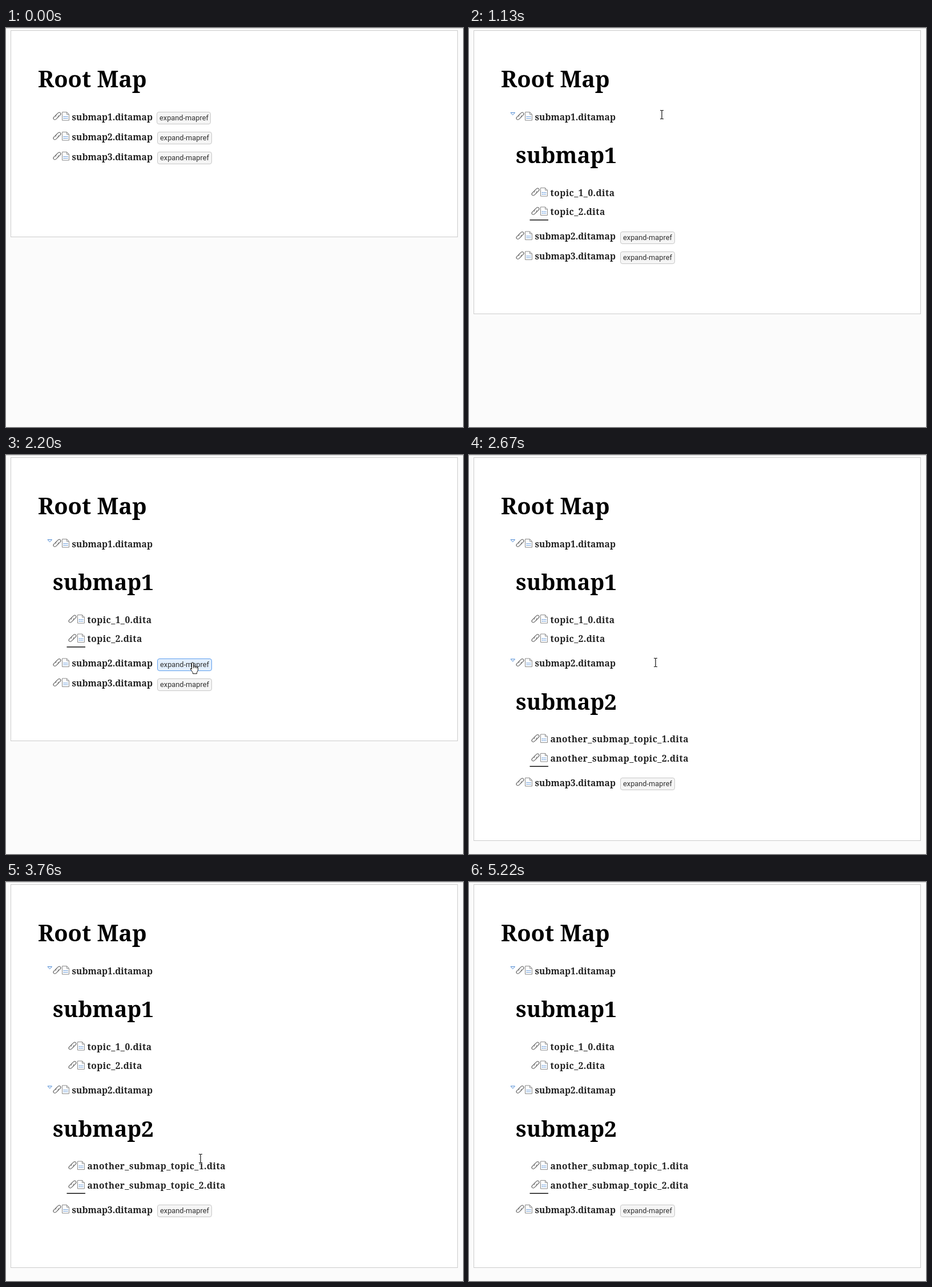
Animation, 801 px wide and 700 px high, one loop 5370 ms. Source, as an HTML page:

```html
<!DOCTYPE html>
<html lang="en">
<head>
<meta charset="utf-8">
<title>Root Map</title>
<style>
  html, body { margin: 0; width: 100%; height: 100%; overflow: hidden; background: #fbfbfb; }
  svg { display: block; }
  text { white-space: pre; }
  .title, .name { font-family: "Noto Serif", serif; font-weight: 700; }
  .title { font-size: 38.5px; }
  .root { font-size: 39.8px; }
  .name { font-size: 15.5px; fill: #222; }
  .topic { letter-spacing: .45px; }
  .label { font: 12.8px Roboto, sans-serif; fill: #333; }
  .tip { font: 12.6px Roboto, sans-serif; fill: #222; }
  .button { fill: #f5f5f5; stroke: #c8c8c8; }
  .hover { fill: #e3effd; stroke: #5f9fee; }
  .page { fill: #fff; stroke: #ccc; }
</style>
</head>
<body>
<svg width="801" height="700" viewBox="0 0 801 700">
  <defs>
    <g id="icons" fill="none">
      <g stroke="#777" stroke-width="1.3" transform="translate(7.5 -2.5) rotate(-45)">
        <path id="chain" d="M1.5-2.6H-5.4a2.6 2.6 0 0 0 0 5.2H-.5a2.6 2.6 0 0 0 2.5-2"/>
        <use href="#chain" transform="rotate(180)"/>
      </g>
      <path d="M16.5-9.5h8l4 4v10.5h-12zM24.5-9.5v4h4" stroke="#8a8a8a"/>
      <path d="M18.5-1.5h8M18.5 1.5h8" stroke="#4f8bd4" stroke-dasharray="2.4 .6"/>
    </g>
    <path id="arrow" d="M-9-9h7.5l-3.75 4.2z" fill="#fff" stroke="#4f8bd4"/>
    <g id="beam" fill="none">
      <path d="M-2.5-7.5h5M0-7.5v15M-2.5 7.5h5" stroke="#fff" stroke-width="2.5"/>
      <path d="M-3-7.5h2l1 .7 1-.7h2M0-7v14M-3 7.5h2l1-.7 1 .7h2" stroke="#111" stroke-width="1.2"/>
    </g>
    <path id="hand" fill="#fff" stroke="#111" stroke-linejoin="round"
      d="M-1.5.5q1.500-1.200 3 0V7q1.500-1 3 .5 2-.8 3 .7 2-.4 2 1.500v4l-2 4v2h-7v-2l-4-5.500q-.8-2 1-1.800l1 1.600zM1.500 7v3M4.500 7.500V10M7.500 8.200v2.300"/>
  </defs>
  <g id="scene"></g>
</svg>
<script>
const LOOP = 5370;
const scene = document.getElementById("scene");

const submaps = [
  { name: "submap1", opens: 1130, topics: ["topic_1_0", "topic_2"] },
  { name: "submap2", opens: 2670, topics: ["another_submap_topic_1", "another_submap_topic_2"] },
  { name: "submap3", opens: Infinity }
];

// Pointer path as [time, x, y]; straight, steady moves between the points
const path = [
  [100, 669, 570], [500, 372, 190], [640, 338, 152], [1450, 338, 152], [1670, 339, 232],
  [2030, 327, 364], [3460, 327, 365], [3760, 341, 485], [4140, 340, 582], [4600, 657, 689], [4680, 657, 689]
];

// The caret shows for one half period after each of these times
const blinkStarts = [1130, 2120, 2670, 3530, 4600, 5220];
const BLINK = 540;

const text = (x, y, kind, str) => `<text x="${x}" y="${y}" class="${kind}">${str}</text>`;
const rect = (x, y, w, h, attrs = "") => `<rect x="${x}" y="${y}" width="${w}" height="${h}" ${attrs}/>`;
const use = (id, x, y) => `<use href="#${id}" x="${x}" y="${y}"/>`;

function pointerAt(t) {
  const next = path.findIndex(point => t < point[0]);
  if (next < 1) return null;
  const [t0, x0, y0] = path[next - 1], [t1, x1, y1] = path[next];
  const k = (t - t0) / (t1 - t0);
  return { x: Math.round(x0 + (x1 - x0) * k), y: Math.round(y0 + (y1 - y0) * k) };
}

const row = (x, y, name, kind = "") =>
  use("icons", x, y) + text(x + 33.5, y + 4.5, "name " + kind, name);

const button = (x, y, width, hovered) =>
  rect(x, y - 9.5, width, 21, `rx="3.5" class="button ${hovered ? "hover" : ""}"`) +
  text(x + 4.5, y + 5, "label", "expand-mapref");

function tip(y) {
  return rect(-1, y - 8, 105.5, 18.5, 'fill="#d3ee90" stroke="#66704d"') +
    rect(0, y - 6, 2, 14) + text(7, y + 5.5, "tip", "Topic Reference");
}

function draw(t) {
  const pointer = pointerAt(t);
  const caretOn = blinkStarts.some(start => t >= start && t < start + BLINK);
  let out = "", overlay = "", cursor = "beam", y = 157;

  submaps.forEach(({ name, opens, topics }, i) => {
    const sinceOpen = t - opens;
    out += row(82, y, name + ".ditamap");
    if (sinceOpen >= 0) {
      out += use("arrow", 82, y + .5) + text(82, y + 80, "title", name);
      topics.forEach((topic, j) => out += row(109, y + 133 + j * 33.5, topic + ".dita", "topic"));
      const last = y + 166.5;
      overlay = caretOn ? rect(106.5, last + 12.6, 32.5, 1.4) : "";
      if (sinceOpen > 110 && sinceOpen < 900) overlay += tip(Math.floor(last));
      y += 209.5;
    } else {
      const x = i ? 265.5 : 264.5, width = i ? 95 : 94, mid = Math.round(y);
      const hovered = pointer && pointer.x > x && pointer.x < x + width && Math.abs(pointer.y - mid - 1) < 11;
      if (hovered) cursor = "hand";
      out += button(x, mid, width, hovered);
      if (sinceOpen >= -100) out += rect(x + width + 2, mid - 9, 1.3, 17);
      y += 35;
    }
  });

  const bottom = Math.max(366.5, Math.floor(y + 65) + .5);
  return rect(0, 0, 801, 1, 'fill="#d4d4d4"') +
    rect(8.5, 4.5, 783, bottom - 4.5, 'class="page"') +
    text(56, 104, "title root", "Root Map") + out + overlay +
    (pointer ? use(cursor, pointer.x, pointer.y) : "");
}

let shown = "";
const start = performance.now();
function frame() {
  const markup = draw((performance.now() - start) % LOOP);
  if (markup !== shown) scene.innerHTML = shown = markup;
  requestAnimationFrame(frame);
}
frame();
</script>
</body>
</html>
```
